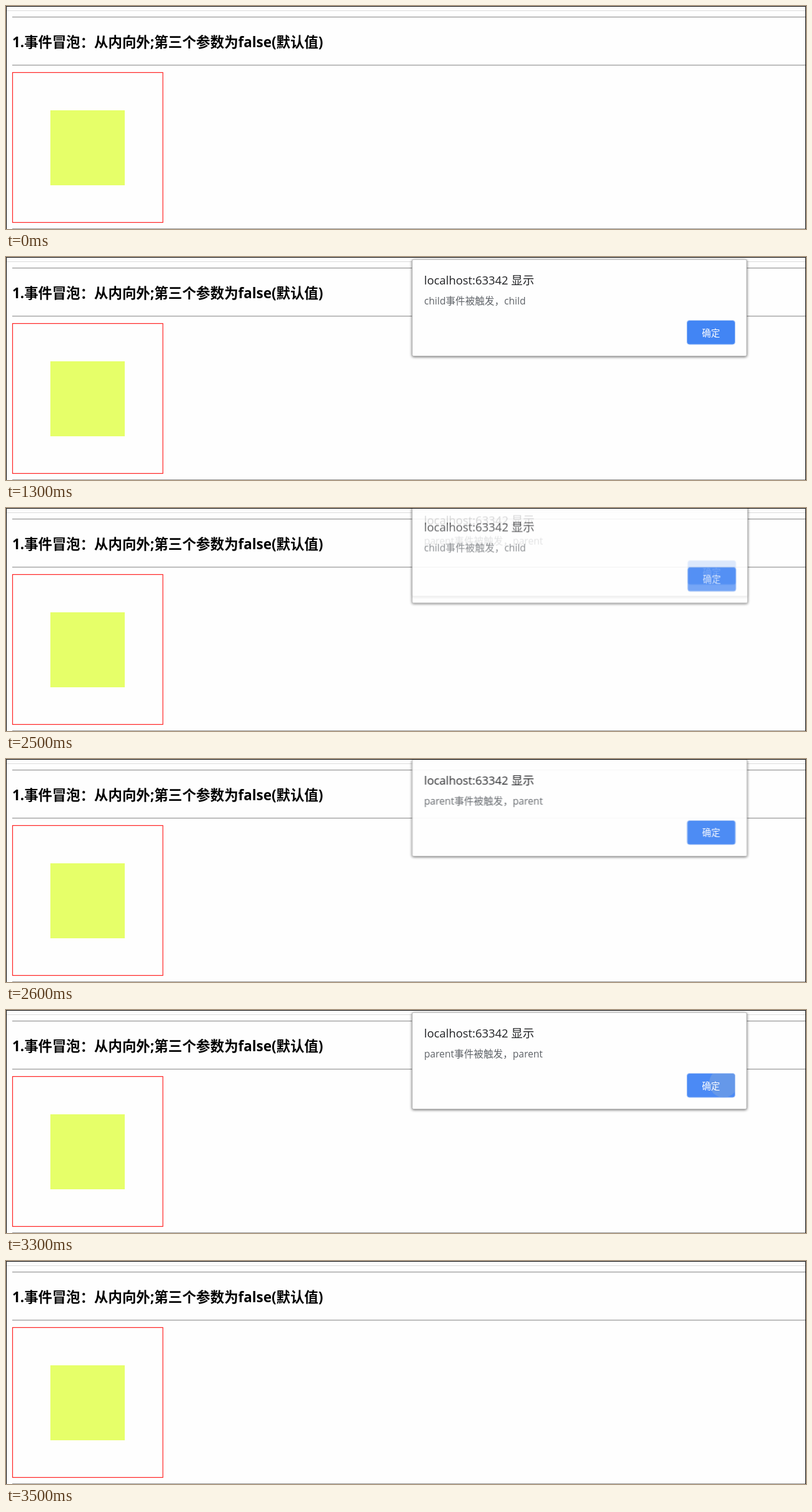
These frames come from a looping animation (1280x357 px, 4.1 s). An HTML page:

```html
<!DOCTYPE html>
<html lang="zh-CN">
<head>
<meta charset="utf-8">
<title>事件冒泡</title>
<style>
  html, body { margin: 0; height: 100%; overflow: hidden; background: #fefefe; }
  svg { display: block; width: 1280px; height: 357px; }
  text { font-family: "Open Sans", "Noto Sans CJK SC", "Noto Sans CJK", sans-serif; }

  .heading { font-size: 22.4px; font-weight: 700; fill: #000; }
  .title { font-size: 18.4px; fill: #202124; }
  .message { font-size: 15.6px; fill: #5f6368; }
  .label { font-size: 14.4px; fill: #fff; text-anchor: middle; }

  .panel { fill: #fefefe; stroke: #bbb; filter: drop-shadow(0 1px 2px #0009); }
  .button { fill: currentColor; stroke: #a9c6f6; }
  .ripple { fill: #6c9be6; opacity: 0; }

  .dialog { color: #4285f4; opacity: 0; transform-origin: 700px 0; }
  .dialog, .ripple { animation: 4100ms step-end infinite; }
  .child { animation-name: child; }
  .parent { animation-name: parent; }
  .child .ripple { animation-name: child-press; }
  .parent .ripple { animation-name: parent-press; }

  @keyframes child {
    0% { opacity: 0; transform: none; }
    29.268% { opacity: .84; transform: translateY(-8.6px) scaleX(1.003); }
    31.707% { opacity: 1; transform: none; color: #4285f4; }
    51.219% { color: #4582eb; }
    53.658% { color: #4a86e8; }
    58.536% { opacity: 1; transform: none; color: #4b8af5; }
    60.975% { opacity: .88; transform: translateY(-6.6px) scaleX(1.003); color: #4285f4; }
    63.414%, 100% { opacity: 0; transform: none; }
  }
  @keyframes parent {
    0% { opacity: 0; transform: none; }
    60.975% { opacity: .18; transform: translateY(-17.5px) scaleX(1.003); color: #4285f4; }
    63.414% { opacity: .94; transform: translateY(-3px) scaleX(1.001); color: #4285f4; }
    65.853% { opacity: 1; transform: none; color: #4a86e8; }
    80.487% { opacity: 1; transform: none; color: #4b8af5; }
    82.926% { opacity: .85; transform: translateY(-6.6px) scaleX(1.003); color: #4285f4; }
    85.365%, 100% { opacity: 0; transform: none; }
  }
  @keyframes child-press {
    0%, 60.975%, 100% { opacity: 0; }
    58.536% { opacity: .8; }
  }
  @keyframes parent-press {
    0%, 82.926%, 100% { opacity: 0; }
    80.487% { opacity: .8; }
  }
</style>
</head>
<body>
<svg viewBox="0 0 1280 357">
  <defs>
    <g id="frame">
      <rect class="panel" x="650" y="4" width="535" height="154.5" rx="2"/>
      <text class="title" x="669" y="44">localhost:63342 显示</text>
      <rect class="button" x="1089.5" y="101.5" width="77" height="38.5" rx="4"/>
    </g>
    <g id="rule">
      <path d="M10 .5H1280" stroke="#9c9c9c"/>
      <path d="M10 1.5H1280" stroke="#e2e2e2"/>
    </g>
    <clipPath id="face"><rect x="1090" y="102" width="76" height="37.5" rx="4"/></clipPath>
  </defs>

  <rect width="1280" height="357" fill="#fefefe"/>
  <path d="M1 7.5H1280" stroke="#dcdcdc"/>
  <use href="#rule" y="17"/>
  <use href="#rule" y="94"/>
  <use href="#rule" y="356"/>
  <text class="heading" x="10" y="66">1.事件冒泡：从内向外;第三个参数为false(默认值)</text>
  <rect x="10.5" y="106.5" width="240.5" height="240" fill="none" stroke="#f22" stroke-width="1.2"/>
  <rect x="71" y="167" width="119" height="120" fill="#e6ff69"/>

  <g class="dialog child">
    <use href="#frame"/>
    <text class="message" x="669" y="76">child事件被触发，child</text>
    <g clip-path="url(#face)"><circle class="ripple" cx="1148" cy="117" r="23"/></g>
    <text class="label" x="1128" y="126.5">确定</text>
  </g>
  <g class="dialog parent">
    <use href="#frame"/>
    <text class="message" x="669" y="76">parent事件被触发，parent</text>
    <g clip-path="url(#face)"><circle class="ripple" cx="1148" cy="117" r="23"/></g>
    <text class="label" x="1128" y="126.5">确定</text>
  </g>

  <path d="M.5 357V.5H1279.5V357" fill="none" stroke="#000"/>
</svg>
</body>
</html>
```
